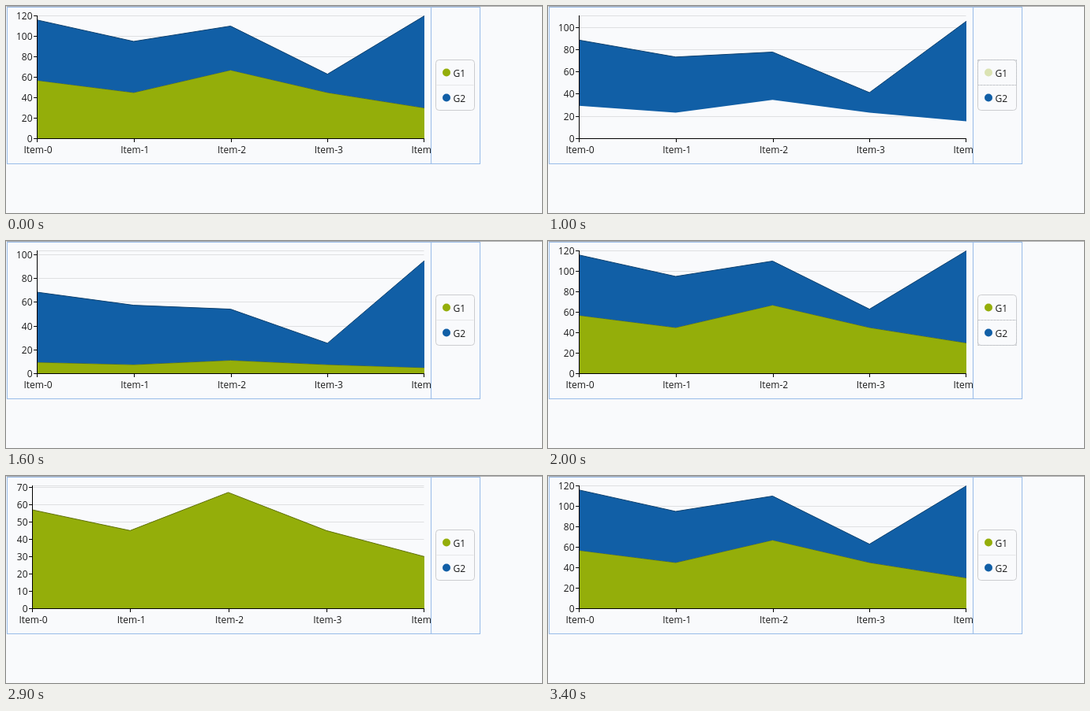
Write an HTML page with a canvas that moves like this. It is 679 by 263 pixels and loops after 3800 ms.

```html
<!DOCTYPE html>
<html lang="en">
<head>
<meta charset="utf-8">
<title>Stacked area chart</title>
<style>
  html, body { margin: 0; width: 100%; height: 100%; overflow: hidden; background: #f9fafc; }
  canvas { display: block; }
</style>
</head>
<body>
<canvas id="stage" width="679" height="263"></canvas>
<script>
const ctx = document.getElementById('stage').getContext('2d');
const LOOP = 3800, STEP = 100, DURATION = 500, LAG = 45;
const TOP = 12, BOTTOM = 168, RIGHT = 530;
const series = [
  { name: 'G1', fill: '#94ae0a', line: '#5f7006', data: [57, 45, 67, 45, 30] },
  { name: 'G2', fill: '#115fa6', line: '#0b3f6e', data: [59, 50, 43, 18, 90] }
];
// Which series are on, and the axis maximum, from each moment
const states = [
  { at: 0, on: [1, 1], max: 120 },
  { at: 800, on: [0, 1], max: 100 },
  { at: 1500, on: [1, 1], max: 120 },
  { at: 2100, on: [1, 0], max: 70 },
  { at: 2900, on: [1, 1], max: 120 }
];

const mix = (a, b, p) => a + (b - a) * p;
const easeInOut = t => t < 0.5 ? 2 * t * t : 1 - 2 * (1 - t) * (1 - t);

function line(x1, y1, x2, y2, color) {
  ctx.strokeStyle = color;
  ctx.beginPath();
  ctx.moveTo(x1 + 0.5, y1 + 0.5);
  ctx.lineTo(x2 + 0.5, y2 + 0.5);
  ctx.stroke();
}

function text(string, x, y, align) {
  ctx.fillStyle = '#1c1c1c';
  ctx.textAlign = align;
  ctx.fillText(string, x, y);
}

function drawChart(t) {
  const index = states.findLastIndex(s => s.at <= t);
  const now = states[index], before = states[Math.max(0, index - 1)];
  const step = Math.floor((t - now.at) / STEP);
  const p = easeInOut(Math.min(1, (step * STEP + LAG) / DURATION));
  const max = mix(before.max, now.max, p);
  const wide = max >= 100;
  const left = wide ? 39 : 33, unit = wide ? 20 : 10;
  const xAt = i => mix(left, RIGHT, i / 4);
  const yAt = v => BOTTOM - v / max * (BOTTOM - TOP);

  ctx.save();
  ctx.beginPath();
  ctx.rect(0, 0, 538, 200);
  ctx.clip();

  line(left, TOP, RIGHT - 1, TOP, '#dfe0e2');
  for (let v = unit; v <= max; v += unit) {
    const y = Math.round(yAt(v));
    line(left, y, RIGHT - 1, y, '#dfe0e2');
  }

  let base = [0, 0, 0, 0, 0];
  series.forEach((s, k) => {
    const share = mix(before.on[k], now.on[k], p);
    const top = s.data.map((v, i) => base[i] + v * share);
    if (now.on[k] && (before.on[k] || step > 0)) {
      const edge = new Path2D();
      top.forEach((v, i) => edge.lineTo(xAt(i), yAt(v) + 0.5));
      const area = new Path2D(edge);
      for (let i = 4; i >= 0; i--) area.lineTo(xAt(i), yAt(base[i]) + 0.5);
      ctx.fillStyle = s.fill;
      ctx.fill(area);
      ctx.strokeStyle = s.line;
      ctx.stroke(edge);
    }
    base = top;
  });

  line(left, TOP - 0.5, left, BOTTOM, '#000');
  line(left, BOTTOM, RIGHT - 0.5, BOTTOM, '#000');
  for (let v = 0; v <= max; v += unit) {
    const y = Math.round(yAt(v));
    line(left - 4.5, y, left, y, '#000');
    text(v, left - 5.5, y + 4.5, 'right');
  }
  for (let i = 0; i < 5; i++) {
    const x = Math.min(RIGHT - 1, Math.round(xAt(i)));
    line(x, BOTTOM, x, BOTTOM + 4.5, '#000');
    text('Item-' + i, xAt(i) + 1.5, 187, 'center');
  }
  ctx.restore();
  return now;
}

function drawLegend(t, on) {
  const focus = t >= 800 && t < 1500 ? 0 : t >= 2000 && t < 2900 ? 1 : -1;
  ctx.strokeStyle = '#cccdd0';
  ctx.beginPath();
  ctx.roundRect(544.5, 68.5, 49, 64, 4);
  ctx.stroke();
  line(545, 100, 592, 100, '#e6e7e9');
  series.forEach((s, k) => {
    const y = 84.5 + 32 * k;
    ctx.globalAlpha = on[k] ? 1 : 0.3;
    ctx.fillStyle = s.fill;
    ctx.beginPath();
    ctx.arc(558, y, 5, 0, 2 * Math.PI);
    ctx.fill();
    ctx.globalAlpha = 1;
    text(s.name, 566.5, y + 5.5, 'left');
  });
  if (focus >= 0) {
    ctx.setLineDash([3, 1]);
    ctx.strokeStyle = '#c3c6cb';
    ctx.strokeRect(544.5, 68.5 + 32 * focus, 49, 32);
    ctx.setLineDash([]);
  }
}

function frame() {
  const t = performance.now() % LOOP;
  ctx.fillStyle = '#f9fafc';
  ctx.fillRect(0, 0, 679, 263);
  ctx.lineWidth = 1;
  ctx.font = '12px "Open Sans", "Noto Sans", sans-serif';
  ctx.strokeStyle = '#99bce8';
  ctx.strokeRect(1.5, 1.5, 599, 199);
  line(538, 1, 538, 200, '#99bce8');
  line(0, 0, 679, 0, '#b0b0b0');
  drawLegend(t, drawChart(t).on);
  requestAnimationFrame(frame);
}
frame();
</script>
</body>
</html>
```
